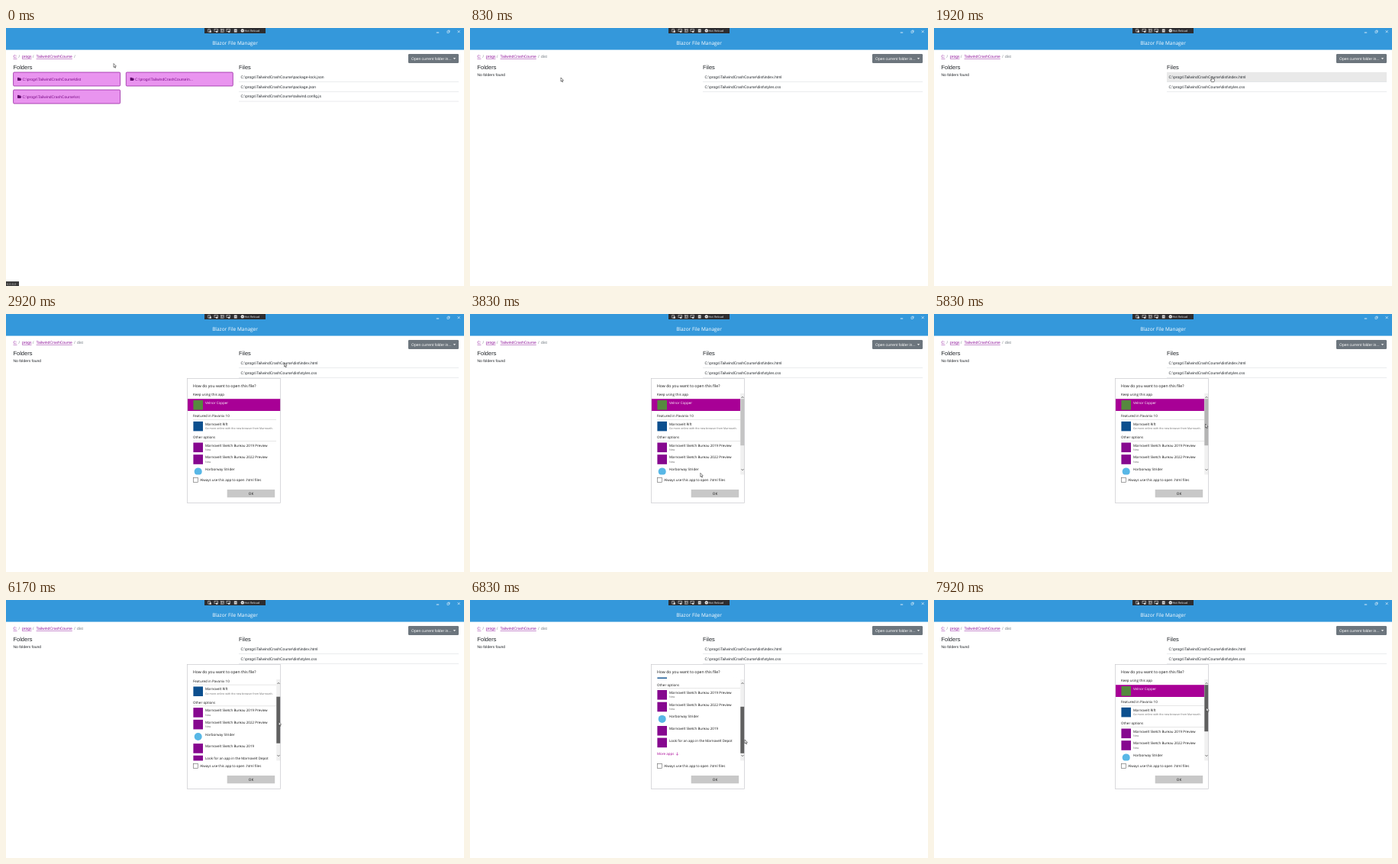
An HTML page with a canvas for the animation above (8000 ms loop, 600 px wide and 338 px high).

```html
<!DOCTYPE html>
<html lang="en">
<head>
<meta charset="utf-8">
<title>Blazor File Manager</title>
<style>
html, body { margin: 0; width: 100%; height: 100%; overflow: hidden; background: #fff; }
canvas { display: block; width: 600px; height: 338px; }
</style>
</head>
<body>
<canvas id="stage"></canvas>
<script>
const W = 600, H = 338, LOOP = 8000, STEP = 1000 / 12;
const ARIAL = '"Liberation Sans", Arial, sans-serif';
const HUMAN = '"Open Sans", "Noto Sans", sans-serif';
const PURPLE = '#a80096', ROOT = 'C:\\progs\\TailwindCrashCourse\\';

const canvas = document.getElementById('stage');
const ctx = canvas.getContext('2d');
const dpr = window.devicePixelRatio || 1;
canvas.width = W * dpr;
canvas.height = H * dpr;

// Step numbers at which the screen changes
const STATUS_OFF = 1, NAVIGATE = 7, DIALOG = 26, SCROLLBAR = 37, GRAB = 72;

// Pointer path: step, x, y
const PATH = [
  [0, 141, 46.5], [5, 119, 65], [11, 119, 65], [18, 350, 65], [20, 364.5, 64],
  [35, 364.5, 64], [38, 345, 100], [41, 325, 150], [47, 300, 213], [50, 255, 190],
  [54, 165, 111], [57, 205, 235], [59, 240, 268], [61, 285, 190], [65, 350, 160],
  [68, 355.5, 144], [72, 355.5, 144], [76, 359, 175], [79, 360, 183],
  [89, 360, 183], [93, 358, 150], [95, 356.8, 141]
];

function pointerAt(step) {
  for (let i = 1; i < PATH.length; i++) {
    const [n0, x0, y0] = PATH[i - 1], [n1, x1, y1] = PATH[i];
    if (step <= n1) {
      const u = (step - n0) / (n1 - n0), k = u * u * (3 - 2 * u);
      return { x: x0 + (x1 - x0) * k, y: y0 + (y1 - y0) * k };
    }
  }
  const [, x, y] = PATH[PATH.length - 1];
  return { x, y };
}

function rect(x, y, w, h, color) {
  ctx.fillStyle = color;
  ctx.fillRect(x, y, w, h);
}

function outline(x, y, w, h, color, width) {
  ctx.strokeStyle = color;
  ctx.lineWidth = width;
  ctx.strokeRect(x, y, w, h);
}

function text(s, x, y, size, color, font = ARIAL, align = 'left') {
  ctx.font = `${size}px ${font}`;
  ctx.fillStyle = color;
  ctx.textAlign = align;
  ctx.fillText(s, x, y);
}

function lines(points, color, width) {
  ctx.beginPath();
  points.forEach(([x, y], i) => i ? ctx.lineTo(x, y) : ctx.moveTo(x, y));
  ctx.strokeStyle = color;
  ctx.lineWidth = width;
  ctx.stroke();
}

function poly(points, fill, stroke, width) {
  ctx.beginPath();
  points.forEach(([x, y]) => ctx.lineTo(x, y));
  ctx.closePath();
  ctx.fillStyle = fill;
  ctx.fill();
  if (stroke) {
    ctx.strokeStyle = stroke;
    ctx.lineWidth = width;
    ctx.stroke();
  }
}

function disc(x, y, r, color) {
  ctx.beginPath();
  ctx.arc(x, y, r, 0, Math.PI * 2);
  ctx.fillStyle = color;
  ctx.fill();
}

function rounded(x, y, w, h, r, fill, stroke) {
  ctx.beginPath();
  ctx.roundRect(x, y, w, h, r);
  ctx.fillStyle = fill;
  ctx.fill();
  if (stroke) {
    ctx.strokeStyle = stroke;
    ctx.lineWidth = 0.7;
    ctx.stroke();
  }
}

function drawToolbar() {
  rect(260, 0, 80, 7, '#2d2d30');
  const ink = '#d8d8d8';
  outline(264.8, 1.3, 2.8, 3.8, ink, 0.6);
  rect(266.5, 3.4, 2.4, 2.4, ink);
  for (const x of [273, 289]) {
    outline(x, 1.5, 4.4, 2.8, ink, 0.6);
    rect(x + 2, 3.6, 2.4, 2.2, ink);
  }
  outline(281.2, 1.2, 4.2, 4.4, ink, 0.5);
  outline(282.4, 2.4, 1.8, 2, ink, 0.5);
  rect(298.8, 1.4, 3.8, 4.2, ink);
  rect(299.5, 3.2, 2.4, 0.5, '#2d2d30');
  disc(309.8, 3.4, 2.2, '#eee');
  rect(308.6, 3.1, 2.4, 0.7, '#555');
  text('Hot Reload', 312.5, 4.9, 3.8, '#eee', HUMAN);
}

function drawHeader() {
  rect(0, 0, W, 28.6, '#3498db');
  drawToolbar();
  text('Blazor File Manager', 300, 22.3, 6.5, '#fff', HUMAN, 'center');
  rect(563.8, 5.6, 3.4, 0.8, '#fff');
  outline(578, 4, 2.4, 2.4, '#fff', 0.5);
  lines([[578.8, 3.2], [581.2, 3.2], [581.2, 5.6]], '#fff', 0.5);
  lines([[591.7, 3.2], [594.7, 6.2]], '#fff', 0.6);
  lines([[594.7, 3.2], [591.7, 6.2]], '#fff', 0.6);
}

function drawLink(s, x) {
  text(s, x, 39.4, 5, '#8a0a96');
  rect(x, 40.1, ctx.measureText(s).width, 0.45, '#8a0a96');
}

function drawBreadcrumb(inside) {
  drawLink('C:', 9.5);
  drawLink('progs', 21);
  drawLink('TailwindCrashCourse', 39.6);
  for (const x of [16.4, 35, 89.2]) text('/', x, 39.4, 5, '#6c757d');
  if (inside) text('dist', 93, 39.4, 5, '#6c757d');
}

function drawCard(name, x, y) {
  rounded(x, y, 140, 18, 1.2, '#e994ef', '#8c1496');
  const ink = '#5f0a6b';
  rect(x + 5.4, y + 6.9, 2.2, 1, ink);
  rect(x + 5.4, y + 7.5, 4.2, 3.2, ink);
  poly([[x + 6.4, y + 8.6], [x + 10.8, y + 8.6], [x + 9.6, y + 10.9], [x + 5.4, y + 10.9]], ink);
  text(ROOT + name, x + 11.8, y + 10.9, 5, '#7a0a86');
}

function drawFiles(names, hover) {
  names.forEach((name, i) => {
    const y = 57.8 + i * 12.8;
    if (hover && i === 0) rect(305, y, 288, 12.8, '#e9e9e9');
    rect(305, y + 12.4, 288, 0.5, '#d5d8dc');
    text(ROOT + name, 307.6, y + 8, 5, '#24292e');
  });
}

function drawPage(step, hover) {
  const inside = step >= NAVIGATE;
  rect(0, 0, W, H, '#fff');
  drawHeader();
  drawBreadcrumb(inside);
  rounded(527, 34, 66, 12, 1.2, '#6c757d');
  text('Open current folder in...', 531, 41.7, 5, '#fff');
  poly([[585.9, 39.2], [589.1, 39.2], [587.5, 40.9]], '#fff');
  text('Folders', 9.4, 53.5, 7.5, '#212529');
  text('Files', 305, 53.5, 7.5, '#212529');
  if (inside) {
    text('No folders found', 9.4, 63.2, 5, '#212529');
    drawFiles(['dist\\index.html', 'dist\\styles.css'], hover);
  } else {
    drawCard('dist', 9.6, 58);
    drawCard('n...', 157.3, 58);
    drawCard('src', 9.6, 81);
    drawFiles(['package-lock.json', 'package.json', 'tailwind.config.js']);
  }
  if (step < STATUS_OFF) {
    rect(0, 332, 17, 6, '#3a3a3a');
    text('0,0,0,0', 1, 336.8, 4, '#bbb');
  }
}

// Offered programs: name, tile top, tile colour, second line
const MAKER = 'Marnovelt';
const APPS = [
  ['Velnor Copper', 113, '#56893f'],
  [MAKER + ' Rift', 140.8, '#0c4f8e', 'Go more online with the new browser from ' + MAKER + '.'],
  [MAKER + ' Sketch Bureau 2019 Preview', 168.5, '#86088f', 'New'],
  [MAKER + ' Sketch Bureau 2022 Preview', 184.2, '#86088f', 'New'],
  ['Harborway Strider', 199.9, '#58b7e6'],
  [MAKER + ' Sketch Bureau 2019', 215.5, '#86088f'],
  ['Look for an app in the ' + MAKER + ' Depot', 231.1, '#86088f']
];

function drawApps(scroll, right) {
  ctx.save();
  ctx.beginPath();
  ctx.rect(238, 101.5, right - 238, 109);
  ctx.clip();
  ctx.translate(0, -scroll);
  text('Keep using this app', 245, 107.4, 4.5, '#111', HUMAN);
  rect(238, 111.2, right - 238, 15.8, PURPLE);
  text('Featured in Pavonix 10', 245, 135, 4.5, '#111', HUMAN);
  text('Other options', 245, 163, 4.5, '#111', HUMAN);
  for (const y of [138.2, 166]) rect(245, y, 109, 0.5, '#ccc');
  APPS.forEach(([name, y, color, note], i) => {
    if (i === 4) disc(251.7, y + 6.5, 5, color);
    else rect(245.4, y, 12.6, 12.6, color);
    text(name, 261, y + 5, 4.5, i ? '#111' : '#fff', HUMAN);
    if (note) text(note, 261, y + 10.4, 3.5, '#666', HUMAN);
  });
  text('More apps', 245, 253.7, 4.5, PURPLE, HUMAN);
  lines([[271.5, 250], [271.5, 253.8]], PURPLE, 0.5);
  lines([[270, 252.3], [271.5, 253.8], [273, 252.3]], PURPLE, 0.5);
  ctx.restore();
}

function drawScrollbar(shift, color) {
  rect(354.3, 104, 5.2, 106.4, '#f0f0f0');
  rect(354.3, 111.2 + shift, 5.2, 61, color);
  lines([[355.5, 109.9], [357, 108.4], [358.5, 109.9]], '#444', 0.8);
  lines([[355.5, 203.2], [357, 204.7], [358.5, 203.2]], '#444', 0.8);
}

function drawDialog(step, pointer) {
  const bar = step >= SCROLLBAR, held = step >= GRAB;
  const shift = held ? Math.min(28.6, Math.max(0, pointer.y - 144)) : 0;
  rect(237, 84, 123, 164, '#fff');
  text('How do you want to open this file?', 245, 95.6, 5.15, '#111', HUMAN);
  drawApps(shift * 50.5 / 28.6, bar ? 354.3 : 359.7);
  if (bar) {
    const over = pointer.x > 354 && pointer.y > 104 && pointer.y < 210;
    drawScrollbar(shift, held ? '#606060' : over ? '#b4b4b4' : '#c4c4c4');
  }
  outline(245.5, 214.6, 6, 6, '#666', 0.6);
  text('Always use this app to open .html files', 254.2, 219.4, 4.5, '#111', HUMAN);
  rect(289.7, 230, 62.5, 10.3, '#c8c8c8');
  text('OK', 321, 236.9, 4.6, '#111', HUMAN, 'center');
  outline(237.5, 84.5, 122, 163, '#c9c9cd', 0.7);
}

function drawPointer({ x, y }, hand) {
  ctx.save();
  ctx.translate(x, y);
  ctx.lineJoin = 'round';
  if (hand) {
    poly([[-0.6, 0], [0.6, 0], [0.7, 2.5], [2.9, 3], [3, 4.8], [2.2, 6.6],
      [-0.9, 6.6], [-2.4, 4], [-1.8, 3.4], [-0.7, 4.2]], '#fff', '#222', 0.55);
  } else {
    poly([[0, 0], [0, 5], [1.1, 4], [1.9, 5.9], [2.7, 5.5], [1.9, 3.7], [3.4, 3.6]],
      '#fff', '#222', 0.55);
  }
  ctx.restore();
}

function draw(now) {
  const step = Math.floor((now % LOOP + 3.4) / STEP) % 96;
  const pointer = pointerAt(step);
  const { x, y } = pointer, open = step >= DIALOG;
  const hover = !open && step >= NAVIGATE && x > 305 && y > 58 && y < 70.5;
  const onCard = step < NAVIGATE && x < 149.6 && y > 58;
  ctx.setTransform(dpr, 0, 0, dpr, 0, 0);
  ctx.textRendering = 'geometricPrecision';
  drawPage(step, hover);
  if (open) drawDialog(step, pointer);
  drawPointer(pointer, hover || onCard);
}

const start = performance.now();
function tick() {
  draw(performance.now() - start);
  requestAnimationFrame(tick);
}
tick();
</script>
</body>
</html>
```
